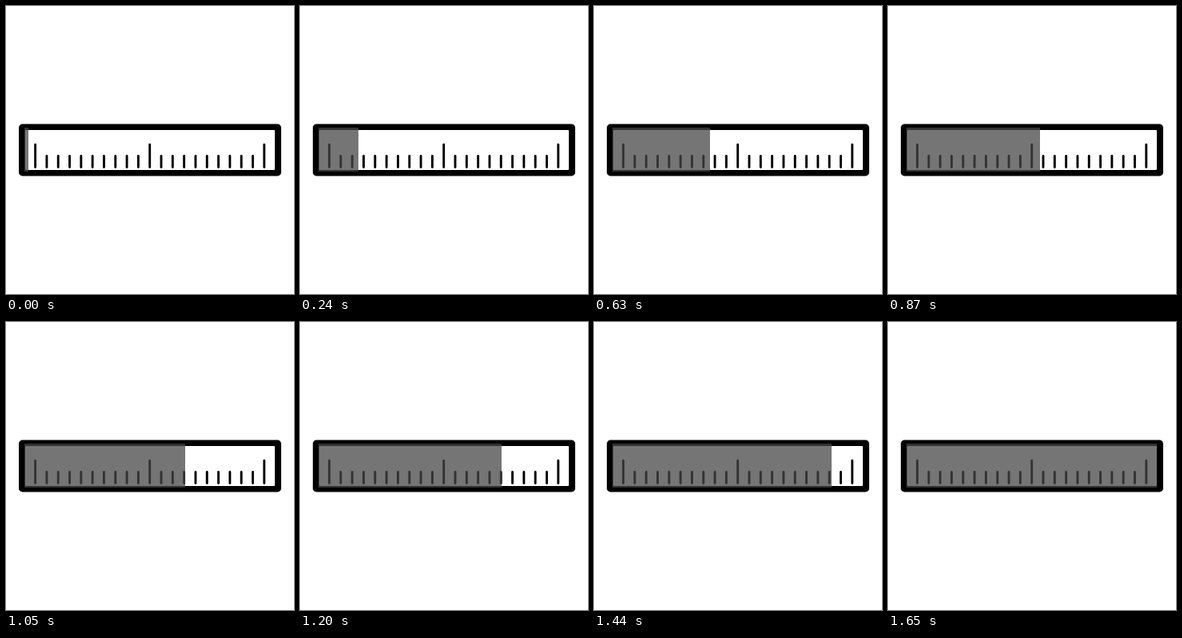
Recreate the animation shown at these times as an HTML page. Size 360 px wide and 360 px high, loop 1.8 s.

```html
<!DOCTYPE html>
<html lang="en">
<head>
<meta charset="utf-8">
<title>Ruler progress</title>
<style>
  html, body {
    margin: 0;
    width: 100%;
    height: 100%;
    overflow: hidden;
    background: #fff;
  }
  .stage {
    position: relative;
    width: 360px;
    height: 360px;
  }
  svg { display: block; }
  .inside { fill: #fff; }
  .ticks { fill: none; stroke: #000; stroke-width: 2.9; stroke-linecap: round; }
  .fill {
    position: absolute;
    left: 23px;
    top: 152px;
    height: 55px;
    background: rgba(69, 69, 69, .74);
    /* The 1 ms lead keeps step boundaries clear of rounding. */
    animation: grow 1800ms -1ms infinite;
  }
  /* 55 steps of 30 ms, then a hold. */
  @keyframes grow {
    0% { width: 4.8px; animation-timing-function: steps(55, end); }
    91.66667%, 100% { width: 312.8px; }
  }
</style>
</head>
<body>
<div class="stage">
  <svg width="360" height="360" viewBox="0 0 360 360">
    <rect x="16" y="147.6" width="328" height="64.8" rx="4.5"/>
    <rect class="inside" x="24" y="155" width="312" height="50" rx="1"/>
    <path class="ticks" id="ticks"/>
  </svg>
  <div class="fill"></div>
</div>
<script>
  const firstX = 36.6, spacing = 14.31, bottom = 201.6;
  let path = '';
  for (let i = 0; i <= 20; i++) {
    const top = i % 10 ? 187.5 : 173.2;
    path += `M${firstX + i * spacing} ${top}V${bottom}`;
  }
  document.getElementById('ticks').setAttribute('d', path);
</script>
</body>
</html>
```
